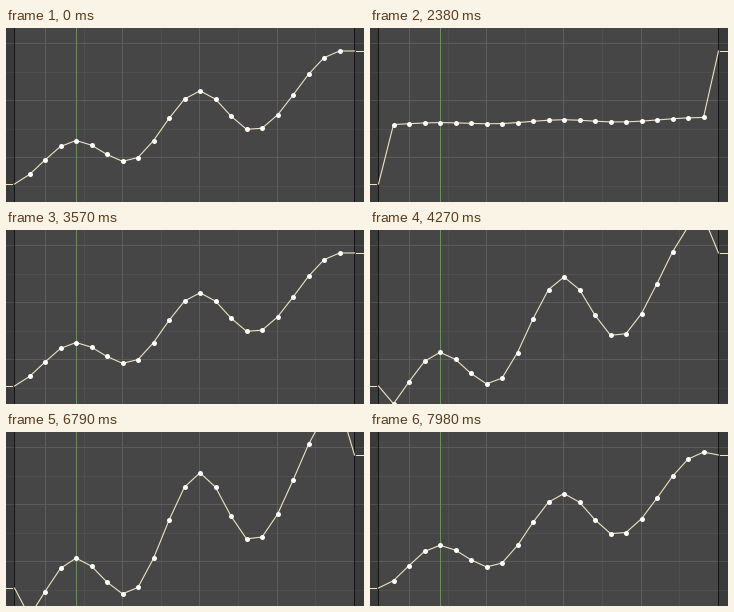
Write a matplotlib script that moves like this. It is 358 by 174 pixels and loops after 8050 ms.

```python
import numpy as np
import matplotlib.pyplot as plt
from matplotlib.animation import FuncAnimation

W, H, DPI = 358, 174, 100
FRAMES, STEP = 115, 70
PX = 72 / DPI

LEFT, RIGHT = 8, 348
Y_START, Y_END = 156, 23
MID = 93.5
CURVE = "#eee4c2"

# Turning points of the curve: (handle index, offset from the mean height)
TURNS = [(-1.3, 62.5), (3, 19), (6.3, 40.3), (11, -30.7), (14.4, 9.3),
         (20, -70.5)]


def wave(i):
    """Smooth ease from one turning point to the next."""
    for (a, ya), (b, yb) in zip(TURNS, TURNS[1:]):
        if i <= b:
            u = (i - a) / (b - a)
            return ya + (yb - ya) * u * u * (3 - 2 * u)


INDEX = np.arange(21)
XS = 23.5 + 15.5 * INDEX
OFFSETS = np.array([wave(i) for i in INDEX])


def scale_at(f):
    """Flatten, rest, stretch to double, rest, return to normal."""
    if f < 23:
        return (1 - f / 23) ** 1.32
    if f < 33:
        return 0
    if f < 72:
        return 2 - 2 * (1 - (f - 33) / 39) ** 1.12
    if f < 89:
        return 2
    return 2 - ((f - 89) / 26) ** 1.07


fig = plt.figure(figsize=(W / DPI, H / DPI), dpi=DPI, facecolor="#464646")
ax = fig.add_axes([0, 0, 1, 1])
ax.set_xlim(0, W)
ax.set_ylim(H, 0)
ax.axis("off")


def vline(x, color, z):
    ax.axvline(x, color=color, lw=PX, zorder=z)


# Grid: every second line is stronger
for k in range(8):
    color, z = (("#5d5d5d", 1.5), ("#4f4f4f", 1))[k % 2]
    vline(39 + 38.6 * k, color, z)
    if k < 6:
        ax.axhline(15 + 28.6 * k, color=color, lw=PX, zorder=z)

# Shade outside the frame range
for a, b in ((0, LEFT), (RIGHT, W)):
    ax.axvspan(a, b, color="black", alpha=0.16, lw=0, zorder=2)
vline(70, "#5f9a4c", 3)
vline(LEFT, "#141414", 3)
vline(RIGHT, "#141414", 3)

for xs, y in (((0, 6), Y_START), ((350, W), Y_END)):
    ax.plot(xs, (y, y), color=CURVE, lw=PX, zorder=4)
line, = ax.plot([], [], color=CURVE, lw=1.1 * PX, zorder=4)
dots, = ax.plot([], [], "o", color="white", ms=5 * PX, mew=0, zorder=5,
                snap=False)


def update(f):
    ys = MID + OFFSETS * scale_at(f)
    line.set_data(np.r_[LEFT + 0.5, XS, RIGHT + 0.5],
                  np.r_[Y_START, ys, Y_END])
    dots.set_data(XS, ys)
    return line, dots


anim = FuncAnimation(fig, update, frames=FRAMES, interval=STEP,
                     repeat=True, repeat_delay=0)
plt.show()
```
